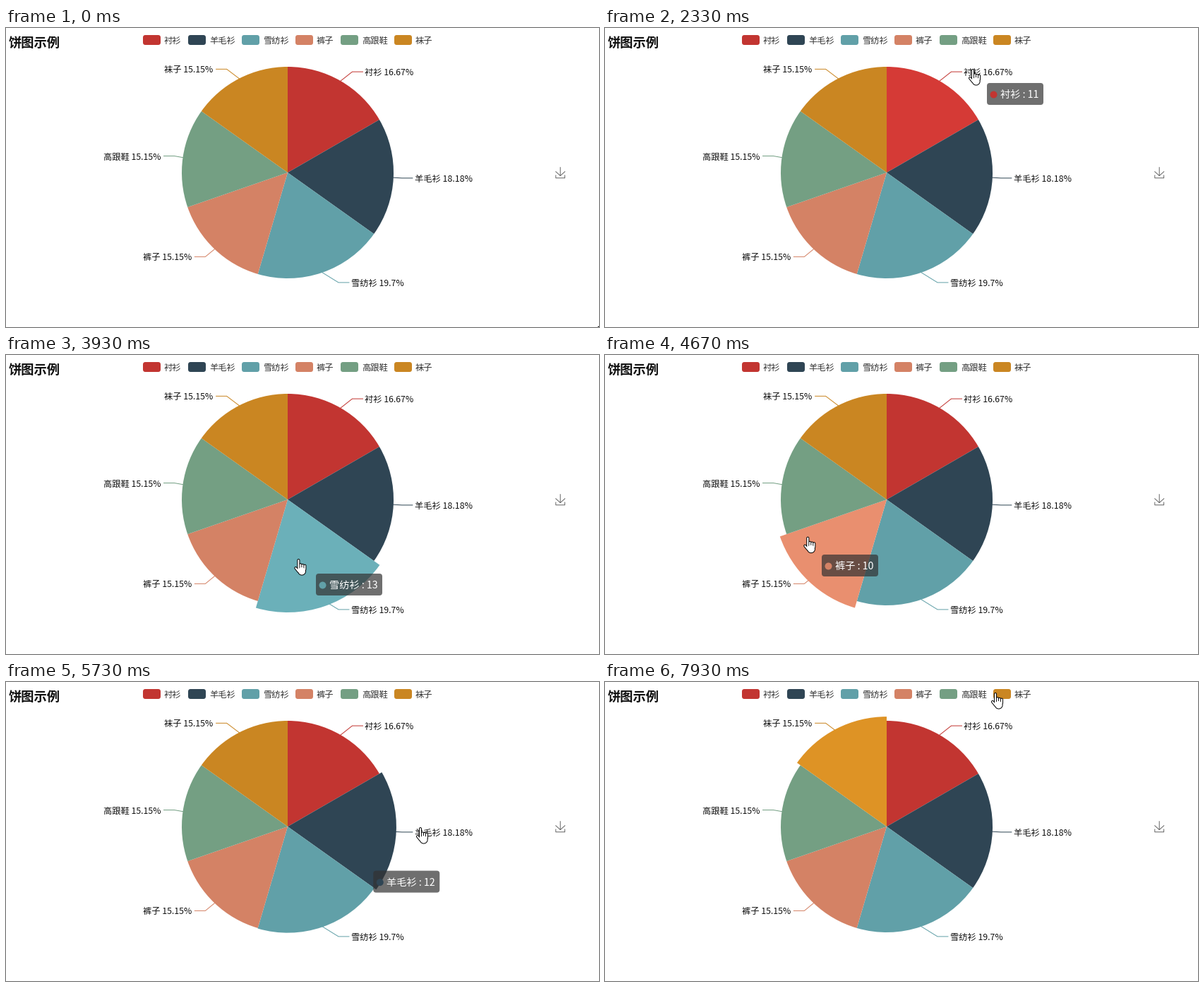
Write a matplotlib script that moves like this. It is 840 by 424 pixels and loops after 8000 ms.

```python
import math

import matplotlib.pyplot as plt
import numpy as np
from matplotlib.animation import FuncAnimation
from matplotlib.colors import to_rgb
from matplotlib.patches import Circle, FancyBboxPatch, Polygon, Wedge

W, H, DPI = 840, 424, 100
LOOP_MS, INTERVAL, STEP_MS = 8000, 40, 1000 / 15
CX, CY, R, GROW, LEAD = 399, 205, 150, 10, 15
PX = 72 / DPI

NAMES = ["衬衫", "羊毛衫", "雪纺衫", "裤子", "高跟鞋", "袜子"]
VALUES = [11, 12, 13, 10, 10, 10]
COLORS = ["#c23531", "#2f4554", "#61a0a8", "#d48265", "#749f83", "#ca8622"]
SHIRT, WOOL, CHIFFON, PANTS, HEELS, SOCKS = range(6)

# the mouse: depart, arrive, x, y, slice it wakes halfway there
START = (839, 423)
STOPS = [
    (1070, 1860, 560, 100, None), (1860, 1960, 521, 58, SHIRT),
    (2500, 2930, 497, 202, WOOL), (3260, 3660, 419, 290, CHIFFON),
    (3920, 4300, 287, 263, PANTS), (4640, 5000, 291, 190, HEELS),
    (5330, 5530, 440, 275, CHIFFON), (5530, 5700, 545, 240, WOOL),
    (5700, 5732, 587, 206, None), (5900, 6500, 562, 16, SOCKS),
    (6700, 6714, 562, 16, None), (7900, 7932, 553, 15, SOCKS),
]
TOGGLE_OFF, TOGGLE_ON = 6707, 7590
TIP_START, TIP_HIDE = (451, 321), 6000
CURSOR_GONE, CURSOR_BACK = 466, 1130


def cubic_out(u):
    return 1 - (1 - min(max(u, 0), 1)) ** 3


def elastic_out(u):
    if u >= 1:
        return 1
    return 1 + 2 ** (-10 * u) * math.sin((u - .1) * math.tau / .4)


def hover_spans():
    """(slice, on, off, point) for each stop that wakes a slice."""
    wake = [(a + b) / 2 for a, b, *_ in STOPS] + [LOOP_MS + 1]
    return [(index, on, off, np.array([x, y]))
            for (_, _, x, y, index), on, off in zip(STOPS, wake, wake[1:])
            if index is not None]


HOVERS = hover_spans()
TIP_STOPS = [h for h in HOVERS if h[1] < TIP_HIDE]


def cursor_at(t):
    at = np.array(START, float)
    for depart, arrive, x, y, _ in STOPS:
        at += np.clip((t - depart) / (arrive - depart), 0, 1) * ((x, y) - at)
    return at


def tip_at(t):
    """Each new target is chased from wherever the tooltip had got to."""
    at = np.array(TIP_START, float)
    ends = [on for _, on, *_ in TIP_STOPS[1:]] + [LOOP_MS]
    for (_, on, _, point), end in zip(TIP_STOPS, ends):
        at += cubic_out((min(t, end) - on) / 400) * (point + 20 - at)
    return at


def grows(point):
    """Outer labels only recolour a slice; slices and legend enlarge it."""
    return math.hypot(*(point - (CX, CY))) < R + GROW or point[1] < 30


def slice_radius(index, t):
    radius = R
    for which, on, off, point in HOVERS:
        if which == index and on <= t and grows(point):
            level = elastic_out((min(t, off) - on) / 300)
            if t >= off:
                level *= 1 - elastic_out((t - off) / 300)
            radius = R + GROW * level
    return radius


def is_hovered(index, t):
    return any(w == index and on <= t < off for w, on, off, _ in HOVERS)


def pie_layout(values):
    """Angles (clockwise from top), leader line, side and text per slice."""
    total, start, slices = sum(values), 0, []
    for name, value in zip(NAMES, values):
        end = start + 360 * value / total
        mid = math.radians((start + end) / 2)
        side = 1 if math.sin(mid) >= 0 else -1
        dx, dy = math.sin(mid), -math.cos(mid)
        y = CY + (R + LEAD) * dy
        x = CX + side * math.sqrt((R + 2 * LEAD) ** 2 - (y - CY) ** 2)
        slices.append(dict(
            angles=np.array([start, end]),
            line=np.array([(CX + R * dx, CY + R * dy),
                           (x - (LEAD + 3) * side, y), (x - 3 * side, y)]),
            anchor=np.array([x, y]), side=side,
            text=f"{name} {round(100 * value / total, 2):g}%"))
        start = end
    return slices


FULL = pie_layout(VALUES)
REDUCED = pie_layout(VALUES[:SOCKS])

plt.rcParams["font.family"] = "Noto Sans CJK JP"
fig = plt.figure(figsize=(W / DPI, H / DPI), dpi=DPI, facecolor="white")
ax = fig.add_axes([0, 0, 1, 1])
ax.set_xlim(0, W)
ax.set_ylim(H, 0)
ax.axis("off")


def label(x, y, text, size=12.3, color="#111111", zorder=3, **kw):
    """Text whose glyphs are centred on y."""
    return ax.text(x, y + .38 * size, text, fontsize=size * PX, color=color,
                   va="baseline", zorder=zorder, **kw)


def rounded(x, y, w, h, radius, **kw):
    box = FancyBboxPatch((x, y), w, h, linewidth=0,
                         boxstyle=f"round,pad=0,rounding_size={radius}", **kw)
    return ax.add_patch(box)


def stroke(points, color, width=1, **kw):
    xs, ys = np.array(points, float).T
    return ax.plot(xs, ys, color=color, lw=width * PX, **kw)[0]


label(4, 20, "饼图示例", 18.3, weight="bold")

swatches, legend_texts, legend_x = [], [], 194
for name, color in zip(NAMES, COLORS):
    swatches.append(rounded(legend_x, 10, 25, 14, 3.5, facecolor=color))
    legend_texts.append(label(legend_x + 30, 17, name, 12.3, "#333333"))
    legend_x += 40 + 12 * len(name)

# download icon: chevron, tray, shaft
for part in ([(-6.4, 6), (0, 11.8), (6.5, 6)],
             [(-6.4, 11.3), (-6.4, 15), (6.4, 15), (6.4, 11.3)],
             [(0, 11.7), (0, 0)]):
    stroke(np.array(part) + (785.2, 197.7), "#666666", snap=False)

leaders = [stroke(s["line"], c, zorder=1) for s, c in zip(FULL, COLORS)]
wedges = [ax.add_patch(Wedge((CX, CY), R, *(s["angles"] - 90), linewidth=0,
                             facecolor=c, zorder=2))
          for s, c in zip(FULL, COLORS)]
labels = [label(0, 0, s["text"]) for s in FULL]

tip_box = rounded(0, 0, 80, 31, 4, facecolor="#323232", alpha=.7, zorder=5)
tip_dot = ax.add_patch(Circle((0, 0), 5, linewidth=0, zorder=6))
tip_text = label(0, 0, "", 14.2, "white", zorder=6)

ARROW = np.array([(0, 0), (0, 16.5), (3.8, 13), (6.3, 18.6), (8.6, 17.6),
                  (6.2, 12), (11.5, 11.6)])
arrow = ax.add_patch(Polygon(ARROW, facecolor="white", edgecolor="black",
                             linewidth=PX, zorder=8))

# hand: four fingers and a thumb as round strokes, over a thick palm stroke
GAP = (np.nan, np.nan)
FINGERS = [p for i in range(4) for p in
           [(3 * i, 7.5 + .7 * i if i else 2), (3 * i, 15), GAP]]
FINGERS = np.array(FINGERS + [(-4, 13), (0, 18)])
PALM = np.array([(4.5, 17), (4.7, 17.6)])
hand = [(shape, stroke(shape, color, width + rim, zorder=z,
                       solid_capstyle="round", solid_joinstyle="round"))
        for z, color, rim in ((8, "black", 2), (9, "white", 0))
        for shape, width in ((FINGERS, 2.1), (PALM, 10))]


def draw_pie(t):
    removed = TOGGLE_OFF <= t < TOGGLE_ON
    mix = cubic_out((t - TOGGLE_OFF) / 300) - cubic_out((t - TOGGLE_ON) / 300)
    for i, full in enumerate(FULL):
        shown = not (removed and i == SOCKS)
        for artist in (wedges[i], leaders[i], labels[i]):
            artist.set_visible(shown)
        if not shown:
            continue
        other = full if i == SOCKS else REDUCED[i]
        (a0, a1), line, (x, y) = (
            full[k] + mix * (other[k] - full[k])
            for k in ("angles", "line", "anchor"))
        if i == SOCKS:
            a1 -= (a1 - a0) * min(mix, .999) * (t >= TOGGLE_ON)
        wedges[i].set_theta1(a0 - 90)
        wedges[i].set_theta2(a1 - 90)
        wedges[i].set_radius(slice_radius(i, t))
        glow = 1.1 if is_hovered(i, t) else 1
        wedges[i].set_facecolor([c * glow for c in to_rgb(COLORS[i])])
        leaders[i].set_data(*line.T)
        state = other if removed else full
        rightward = state["side"] > 0
        labels[i].set_position((x if rightward else x - 1, y + 4.7))
        labels[i].set_ha("left" if rightward else "right")
        labels[i].set_text(state["text"])
    swatches[SOCKS].set_facecolor("#cccccc" if removed else COLORS[SOCKS])
    legend_texts[SOCKS].set_color("#cccccc" if removed else "#333333")


def draw_tooltip(t):
    shown = TIP_STOPS[0][1] <= t < TIP_HIDE
    for artist in (tip_box, tip_dot, tip_text):
        artist.set_visible(shown)
    if not shown:
        return
    index = [which for which, on, *_ in TIP_STOPS if on <= t][-1]
    x, y = tip_at(t)
    tip_box.set_bounds(x, y, 52 + 14 * len(NAMES[index]), 31)
    tip_dot.center = (x + 9.5, y + 16.5)
    tip_dot.set_facecolor(COLORS[index])
    tip_text.set_position((x + 19, y + 21))
    tip_text.set_text(f"{NAMES[index]} : {VALUES[index]}")


def draw_cursor(t):
    at = cursor_at(t)
    pointing = t >= HOVERS[0][1]
    arrow.set_visible(not pointing and not CURSOR_GONE <= t < CURSOR_BACK)
    arrow.set_xy(ARROW + at)
    for shape, part in hand:
        part.set_visible(pointing)
        part.set_data(*(shape + at).T)


def update(i):
    # motion is held on a 15 fps clock
    t = (i * INTERVAL + 30) // STEP_MS * STEP_MS
    draw_pie(t)
    draw_tooltip(t)
    draw_cursor(t)
    return []


anim = FuncAnimation(fig, update, frames=LOOP_MS // INTERVAL,
                     interval=INTERVAL, repeat=True, repeat_delay=0,
                     init_func=lambda: update(0), blit=False)
plt.show()
```
